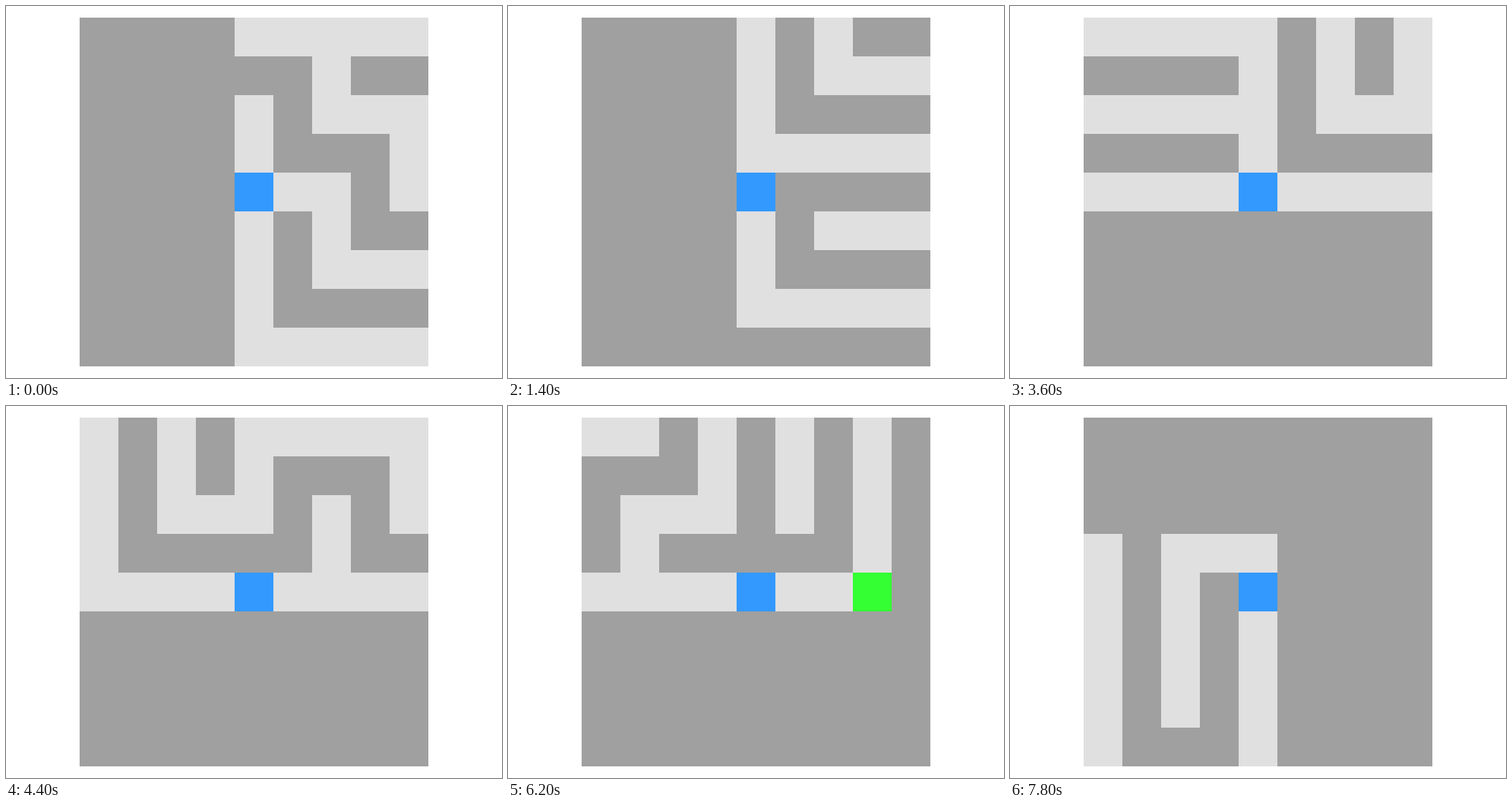
An HTML page with a canvas for the animation above (8 s loop, 640x480 px).

```html
<!DOCTYPE html>
<html>
<head>
<meta charset="utf-8">
<title>Maze walk</title>
<style>
html, body { margin: 0; width: 100%; height: 100%; overflow: hidden; background: #fff; }
canvas { display: block; }
</style>
</head>
<body>
<canvas id="stage" width="640" height="480"></canvas>
<script>
const ctx = document.getElementById('stage').getContext('2d');
const CELL = 50, LEFT = 95, TOP = 15, VIEW = 9, REACH = 4, STEP_MS = 200;
const COLORS = { '#': '#a0a0a0', '.': '#e0e0e0', G: '#33ff33', player: '#3399ff' };
const DIRECTIONS = { U: [0, -1], D: [0, 1], L: [-1, 0], R: [1, 0] };

// Cells outside the listed rows count as wall.
const levels = [
  {
    start: [0, 4],
    moves: 'DDDU' + 'D'.repeat(6) + 'R'.repeat(7) + 'L' + 'R'.repeat(15),
    maze: [
      '.....',
      '##.##',
      '.#...',
      '.###.',
      '...#.',
      '.#.##',
      '.#...',
      '.####',
      '.......#.#.......#.#.#.',
      '.#####.#.#.###.###.#.#.',
      '.#.....#...#.#.#...#.#.',
      '.#####.#####.###.#####.',
      '......................G'
    ]
  },
  {
    start: [4, 0],
    moves: 'DURRD',
    maze: [
      '...#...',
      '.#.#.#.',
      '.#.#.#.',
      '.#.#.#.',
      '.#.#.#.',
      '.#.###.'
    ]
  }
];

const poses = levels.flatMap(({ start, moves, maze }) => {
  let [x, y] = start;
  const trail = [{ maze, x, y }];
  for (const move of moves) {
    const [dx, dy] = DIRECTIONS[move];
    x += dx;
    y += dy;
    trail.push({ maze, x, y });
  }
  return trail;
});

function drawCell(col, row, color) {
  ctx.fillStyle = color;
  ctx.fillRect(LEFT + col * CELL, TOP + row * CELL, CELL, CELL);
}

function draw({ maze, x, y }) {
  for (let row = 0; row < VIEW; row++) {
    for (let col = 0; col < VIEW; col++) {
      const tile = maze[y + row - REACH]?.[x + col - REACH] ?? '#';
      drawCell(col, row, COLORS[tile]);
    }
  }
  drawCell(REACH, REACH, COLORS.player);
}

function tick() {
  draw(poses[Math.floor(performance.now() / STEP_MS) % poses.length]);
  requestAnimationFrame(tick);
}
tick();
</script>
</body>
</html>
```
